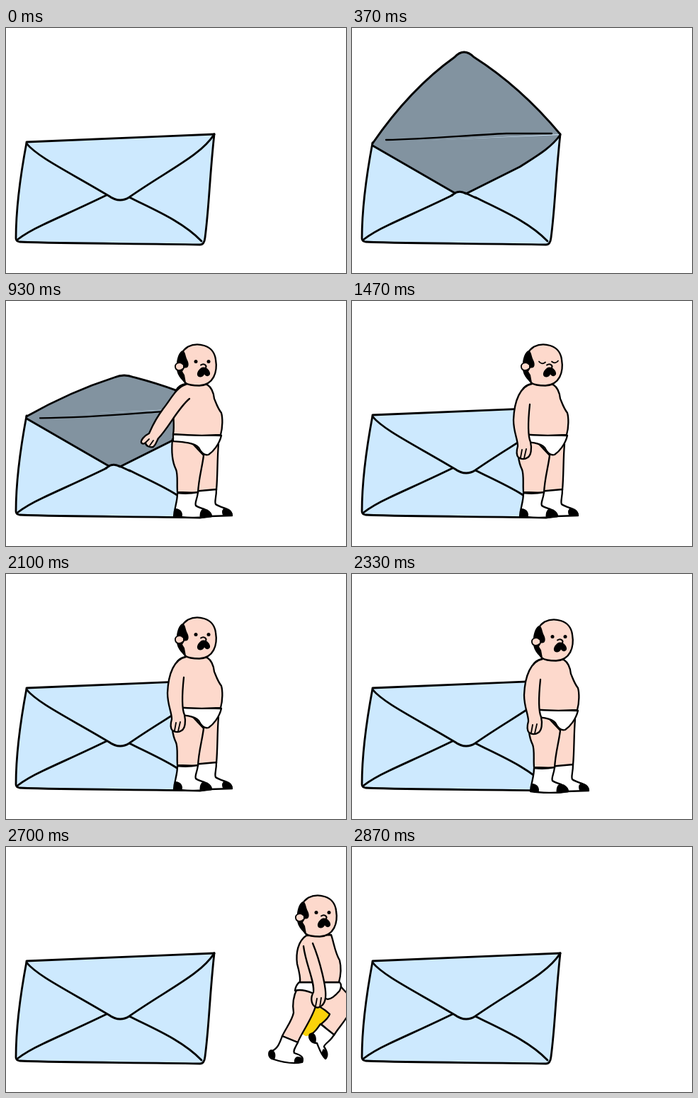
Write an HTML page with a canvas that moves like this. It is 480x346 px and loops after 3.61 s.

```html
<!DOCTYPE html>
<html lang="en">
<head>
<meta charset="utf-8">
<title>Envelope</title>
<style>
html, body { margin: 0; width: 100%; height: 100%; overflow: hidden; background: #fff; }
canvas { display: block; }
</style>
</head>
<body>
<canvas id="stage" width="480" height="346"></canvas>
<script>
const ctx = document.getElementById('stage').getContext('2d');
const LOOP = 3610;
const BLUE = '#cde9fe', GREY = '#8293a0', SKIN = '#fdd9cc', INK = '#000', YELLOW = '#fbd20a';

function fill(d, color) {
  ctx.fillStyle = color;
  ctx.fill(new Path2D(d));
}
function line(d, width = 2.3) {
  ctx.lineWidth = width;
  ctx.stroke(new Path2D(d));
}
function shape(d, color, width) {
  fill(d, color);
  line(d, width);
}
function dot(x, y, r) {
  ctx.beginPath();
  ctx.arc(x, y, r, 0, 7);
  ctx.fillStyle = INK;
  ctx.fill();
}

// ---- envelope: tip is the height of the flap's point ----

const FRONT = 'M29 162 C20 210 14 260 14 297 Q14 301 19 302 C95 305 185 304 274 306 Q280 306 281 296 C287 250 287 215 294 150';
const FOLDS = 'M142 236 C105 254 75 267 52 278 C35 286 25 292 16 299 M174 239 C205 255 248 272 276 301';
const EDGE = 'M29 166 C65 187 105 210 145 233 Q153 229 161 234 L237 196 C262 180 280 170 294 151';

function envelope(tip) {
  const closed = tip >= 243;
  fill(FRONT + 'Z', BLUE);
  if (!closed) {
    fill(EDGE + ' L29 162Z', GREY);
    if (tip < 150) flapUp(tip);
    line(EDGE, 2.8);
    line('M146 233 L141 236 M160 233 L175 240', 2.8);
  }
  line(FRONT, 2.8);
  line(FOLDS, 2.8);
  if (tip >= 150) flapDown((tip - 156) / 87);
}

function flapUp(tip) {
  const lift = (150 - tip) / 116;
  const x = 158 + (1 - lift) * 14;
  const y = tip + 7 * lift;
  const mid = (163 + y) / 2 - 2 - 14 * lift;
  const d = `M29 163 Q${x - 76} ${mid} ${x - 13} ${y} Q${x} ${tip - 7 * lift} ${x + 14} ${y} Q${x + 80} ${mid - 3} 294 150`;
  fill(d + 'Z', GREY);
  line(d, 2.8);
  const sag = (1 - lift) * 17;
  line(`M48 ${158 + sag * .7} C110 ${157 + sag * .8} 165 ${151 + sag * .9} 218 ${149 + sag * .7} L282 ${149 + sag * .5}`, 2.3);
}

function flapDown(k) {
  const y = v => 156 + (v - 156) * k;
  const d = `M29 163 C44 ${y(182)} 90 ${y(204)} 145 ${y(237)} Q160 ${y(248)} 174 ${y(239)} C230 ${y(200)} 275 ${y(180)} 294 150`;
  fill(d + 'Z', BLUE);
  line(d, 2.8);
  line('M29 161 C110 157 205 154 294 150', 2.8);
}

// ---- man ----

function head(x, y, turn = 0, faceY = 0, asleep = false) {
  ctx.save();
  ctx.translate(x, y);
  ctx.rotate(turn);
  shape('M-18 25 C-31 10 -30 -16 -14 -26 C-2 -32 22 -30 25 -8 C28 10 22 28 2 29 C-8 29 -14 28 -18 25Z', SKIN);
  fill('M-23 -20 C-18 -22 -18 -13 -15 -7 C-12 -1 -13 5 -19 4 L-22 9 L-19 14 L-17 25 C-28 19 -32 7 -30 -4 C-29 -11 -27 -17 -23 -20Z', INK);
  shape('M-21 -1 C-26 -6 -33 -2 -32 3 C-31 8 -25 9 -21 5', SKIN, 1.8);
  ctx.translate(0, faceY);
  if (asleep) {
    line('M-7 -5 Q-3 0 2 -4 M11 -5 Q16 -1 20 -6', 1.8);
  } else {
    dot(-3, -5, 2.5);
    dot(15, -5, 2.5);
  }
  line('M4 0 C8 -3 13 0 11 4', 2);
  fill('M7 3 C13 2 18 9 17 13 C15 17 11 16 9 13 C7 18 0 18 -1 14 C-2 9 4 3 7 3Z', INK);
  ctx.restore();
}

function foot(sock, ...dark) {
  shape(sock, '#fff');
  dark.forEach(d => fill(d, INK));
}

function stand(arm, asleep) {
  shape('M266 208 L300 202 C298 225 299 245 297 267 L266 269Z', SKIN);
  foot('M264 269 L297 266 C297 278 294 283 296 287 C304 293 318 292 319 303 L288 304 L264 289Z',
    'M307 293 C315 292 320 297 320 303 L307 304 Q303 298 307 293Z');
  shape('M235 195 C233 215 236 230 240 238 C243 245 241 258 242 270 L271 271 C272 250 277 235 279 218 L262 200Z', SKIN);
  foot('M242 271 Q256 273 271 270 C270 280 266 285 268 289 C275 294 289 294 290 304 C275 307 250 306 237 304 C238 290 242 285 242 271Z',
    'M237 304 Q236 295 239 293 C247 293 251 300 248 306Z',
    'M278 293 Q290 295 291 305 L274 307 Q272 298 278 293Z');
  shape('M236 188 L304 190 C301 203 292 213 286 217 C279 219 275 213 272 207 C266 200 250 199 236 198Z', '#fff');
  shape('M254 117 C240 119 236 130 236 150 C236 165 238 178 236 188 Q270 191 303 189 C306 178 306 165 304 158 C298 150 296 142 294 138 C293 128 290 122 284 118Z', SKIN);
  if (arm === 'reach') {
    const d = 'M254 118 C240 122 232 140 222 152 C210 168 206 178 202 187 C196 190 190 196 191 200 C193 203 196 201 197 200 C197 205 203 207 208 206 C213 201 213 197 215 194 C229 180 243 151 259 138';
    fill(d + ' L264 121Z', SKIN);
    line(d);
    line('M197 200 L202 195 M203 204 L208 197', 1.8);
  } else {
    const d = 'M254 117 C238 120 229 140 228 168 C228 185 234 195 234 205 C232 212 232 218 235 221 C240 224 245 223 248 221 C253 218 254 208 252 199 C248 190 249 165 251 146';
    fill(d + ' L264 121Z', SKIN);
    line(d);
    line('M238 221 L240 210 M243 222 L246 209', 1.8);
  }
  head(271, 90.5, 0, 0, asleep);
}

function stride() {
  fill('M351 225 L371 235 L357 252 C352 262 348 266 336 267 L328 262Z', YELLOW);
  shape('M345 203 L384 195 C394 208 404 212 402 224 C398 240 382 255 376 266 L358 250 C364 245 369 240 370 236 C362 228 356 226 350 222Z', SKIN);
  foot('M357 250 L376 265 C372 274 362 278 362 282 C366 288 368 295 364 299 C358 294 355 284 352 277 C345 277 340 272 342 265 C350 262 352 256 357 250Z',
    'M341 264 C348 259 353 268 350 277 C343 277 338 270 341 264Z',
    'M361 285 C367 288 368 295 365 300 C359 296 357 290 361 285Z');
  shape('M324 200 C318 212 317 222 319 234 C317 245 308 256 303 267 L325 276 C328 266 345 243 350 225 L352 203Z', SKIN);
  foot('M303 267 L325 276 C321 284 318 288 320 291 C330 294 334 297 331 304 C318 307 300 303 288 299 C282 295 284 286 288 288 C297 285 300 275 303 267Z',
    'M287 286 C293 287 295 294 292 300 C284 298 282 290 287 286Z',
    'M324 296 Q334 296 332 305 L320 305 Q319 298 324 296Z');
  shape('M327 191 L384 191 Q388 195 384 203 C378 210 372 215 367 215 L345 206 Q330 200 321 203 Q322 195 327 191Z', '#fff');
  shape('M337 125 C325 133 322 150 324 165 C327 176 329 184 328 191 L383 191 C386 180 386 168 384 160 C377 148 376 135 372 124Z', SKIN);
  const d = 'M333 140 C336 165 349 190 347 205 C343 212 343 222 350 226 C356 229 363 222 364 213 C366 200 356 160 346 136';
  fill(d, SKIN);
  line(d);
  line('M350 225 L352 214 M356 226 L358 213', 1.8);
  head(354, 97.5);
}

function tumble() {
  // far arm and far leg
  shape('M190 148 C215 153 233 148 237 133 C240 122 240 117 241 110 C242 106 245 107 245 111 L247 115 C247 106 250 101 252 105 L253 115 C256 108 259 109 258 114 L257 119 C263 122 268 126 264 129 C260 131 254 128 252 131 C249 145 244 153 236 158 C229 162 220 165 212 165Z', SKIN);
  shape('M232 168 C250 160 262 153 273 156 C286 160 290 170 291 176 L280 190 C272 185 260 181 248 188Z', SKIN);
  foot('M291 176 C300 182 310 179 318 175 C325 171 330 173 327 179 C322 188 313 190 308 199 C304 207 294 206 291 201 C293 195 286 190 279 190Z',
    'M317 176 C325 170 331 173 327 180 L322 186 Q315 182 317 176Z',
    'M291 200 C295 195 305 196 307 201 C303 207 294 207 291 200Z');
  // torso, briefs, near arm
  fill('M150 162 C170 148 200 143 210 150 C217 155 220 165 214 172 L172 205 Q160 212 153 207Z', SKIN);
  line('M160 151 C175 147 200 143 210 150 C216 155 220 161 216 168');
  shape('M153 209 C162 210 170 208 177 198 L188 212 L169 228 Q158 221 153 209Z', '#fff');
  const arm = 'M146 170 C143 180 139 196 132 201 C122 201 113 195 104 193 C98 188 88 188 84 191 C81 195 84 198 86 199 C86 203 91 205 94 205 C97 209 103 210 107 208 C117 214 128 222 137 225 C147 224 150 216 152 208 C155 198 157 190 158 181';
  fill(arm + ' L165 155Z', SKIN);
  line(arm);
  line('M86 199 Q90 194 96 196 M94 205 Q97 200 102 201', 1.8);
  // near leg
  shape('M168 226 C172 205 185 185 202 173 C217 164 238 162 246 170 C251 180 244 191 237 199 C231 206 225 214 221 223 L200 213 C203 207 206 202 208 197 C197 208 186 224 175 230 Q169 231 168 226Z', SKIN);
  foot('M200 212 Q210 219 221 222 C215 234 206 240 201 249 C198 255 198 264 192 265 C185 266 185 257 188 249 C188 242 185 235 187 226 C195 226 198 220 200 212Z',
    'M187 224 C194 222 196 231 191 238 C186 237 185 229 187 224Z',
    'M188 254 C192 255 196 256 197 258 C196 266 190 268 186 264 Q184 259 188 254Z');
  head(138, 142, -.49, -11);
}

const poses = {
  tumble,
  stride,
  reach: () => stand('reach'),
  stand: () => stand('down'),
  blink: () => stand('down', true)
};

// start ms, flap tip, pose, dx, dy, lean, behind the front
const steps = [
  [0, 243],
  [230, 205],
  [300, 110],
  [370, 34],
  [430, 34, 'tumble', 8, 85, 0, true],
  [530, 34, 'tumble', 2, 40, 0, true],
  [630, 34, 'tumble', 0, 0],
  [730, 34, 'reach', 0, 0, .16],
  [800, 38, 'reach', 0, 2, .06],
  [860, 70, 'reach', 0, 0],
  [930, 105, 'reach', 0, 0],
  [970, 140, 'reach', 0, 0],
  [1030, 215, 'reach', 0, 0],
  [1100, 243, 'stand', 0, 0],
  [1470, 243, 'blink', 0, 0],
  [1570, 243, 'stand', 0, 0],
  [2270, 243, 'stand', 4, 1],
  [2330, 243, 'stand', 15, 3],
  [2400, 243, 'stride', -49, 0],
  [2470, 243, 'stand', 55, 4],
  [2530, 243, 'stride', 0, 0],
  [2570, 243, 'stride', 23, 2],
  [2630, 243, 'stand', 134, 4],
  [2700, 243, 'stride', 87, 0],
  [2770, 243, 'stand', 203, 4],
  [2830, 243, 'stride', 150, 0],
  [2870, 243]
];

function man(pose, dx, dy, lean = 0) {
  ctx.save();
  ctx.translate(275 + dx, 300 + dy);
  ctx.rotate(lean);
  ctx.translate(-275, -300);
  poses[pose]();
  ctx.restore();
}

function draw(t) {
  const [, tip, pose, dx, dy, lean, behind] = steps.findLast(s => s[0] <= t);
  ctx.fillStyle = '#fff';
  ctx.fillRect(0, 0, 480, 346);
  ctx.strokeStyle = INK;
  ctx.lineCap = ctx.lineJoin = 'round';
  envelope(tip);
  if (!pose) return;
  ctx.save();
  if (behind) ctx.clip(new Path2D('M0 0 H480 V60 L294 151 L237 195 L153 230 L29 165 L0 150Z'));
  man(pose, dx, dy, lean);
  ctx.restore();
}

const start = performance.now();
function tick() {
  draw((performance.now() - start) % LOOP);
  requestAnimationFrame(tick);
}
tick();
</script>
</body>
</html>
```
